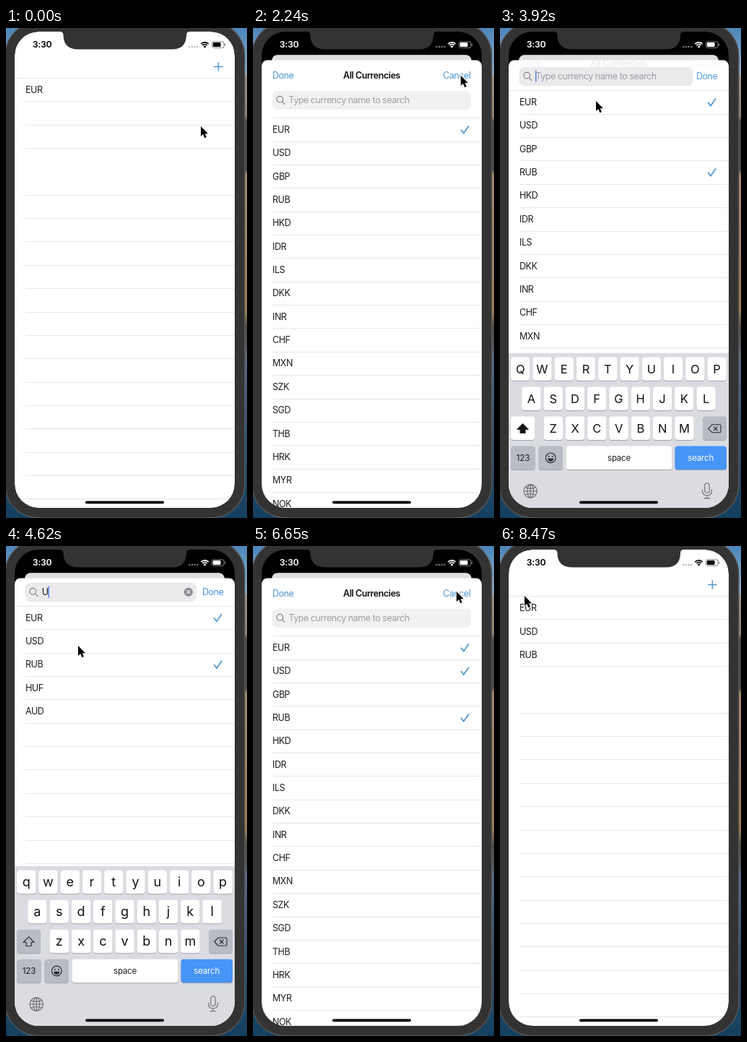
Recreate the animation shown at these times as an HTML page with a canvas. Size 334x678 px, loop 8540 ms.

```html
<!DOCTYPE html>
<html lang="en">
<head>
<meta charset="utf-8">
<title>Currency picker</title>
<style>
html, body { margin: 0; width: 100%; height: 100%; overflow: hidden; background: #333; }
canvas { display: block; width: 334px; height: 678px; }
</style>
</head>
<body>
<canvas id="stage" width="334" height="678"></canvas>
<script>
const ctx = document.getElementById('stage').getContext('2d');
const LOOP = 8540, STEP = 70, ROW = 32.35;
const LEFT = 12, RIGHT = 317, TOP = 5, BOTTOM = 664;
const BLUE = '#4c95cd', INK = '#1c1c1e', LINE = '#e6e6e8';
const CURRENCIES = 'EUR USD GBP RUB HKD IDR ILS DKK INR CHF MXN SZK SGD THB HRK MYR NOK'.split(' ');
const FILTERED = 'EUR USD RUB HUF AUD'.split(' ');

const T = {
  present: 880, tickRub: 2800, focus: 3470, keyboard: 3550, activate: 3640,
  type: 4300, tickUsd: 5200, finish: 6070, dismiss: 7680
};

// time, x, y of the pointer tip
const POINTER = [
  [70, 270, 136], [770, 293, 54], [2150, 293, 54], [2730, 215, 236], [3040, 215, 236],
  [3290, 133, 101], [4200, 133, 101], [4550, 100, 138], [5380, 100, 138],
  [5950, 282, 63], [6650, 282, 63], [7300, 33, 66], [7750, 33, 66], [8100, 34, 69]
];

const clamp = v => Math.max(0, Math.min(1, v));
const mix = (a, b, p) => a + (b - a) * p;
const ease = v => { v = clamp(v); return v * v * (3 - 2 * v); };
const during = (t, from, to) => t >= from && t < to;

// Critically damped approach from 0 to 1
function spring(ms, rate) {
  if (ms <= 0) return 0;
  const x = ms / 1000 * rate;
  return 1 - (1 + x) * Math.exp(-x);
}

function pointerAt(t) {
  const i = POINTER.findIndex(p => p[0] > t);
  if (i < 0) return POINTER[POINTER.length - 1].slice(1);
  if (i === 0) return POINTER[0].slice(1);
  const a = POINTER[i - 1], b = POINTER[i];
  const p = ease((t - a[0]) / (b[0] - a[0]));
  return [mix(a[1], b[1], p), mix(a[2], b[2], p)];
}

function box(x, y, w, h, r, fill) {
  ctx.beginPath();
  ctx.roundRect(x, y, w, h, r);
  if (fill) { ctx.fillStyle = fill; ctx.fill(); }
}

function disc(x, y, r, fill) {
  ctx.beginPath();
  ctx.arc(x, y, r, 0, 7);
  ctx.fillStyle = fill;
  ctx.fill();
}

// Draws open strokes given as an SVG path
function stroke(path, color, width = 1.2) {
  ctx.strokeStyle = color;
  ctx.lineWidth = width;
  ctx.lineCap = ctx.lineJoin = 'round';
  ctx.stroke(new Path2D(path));
}

function label(str, x, y, { size = 12.5, weight = 400, color = INK, align = 'left', track = -0.45 } = {}) {
  ctx.font = `${weight} ${size}px Inter, sans-serif`;
  ctx.letterSpacing = track + 'px';
  ctx.textAlign = align;
  ctx.fillStyle = color;
  ctx.fillText(str, x, y + size * 0.36);
}

function rule(x, y) {
  ctx.fillStyle = LINE;
  ctx.fillRect(x, Math.round(y), RIGHT - x, 1);
}

function faded(alpha, draw) {
  if (alpha <= 0) return;
  ctx.save();
  ctx.globalAlpha *= alpha;
  draw();
  ctx.restore();
}

function wallpaper() {
  const g = ctx.createLinearGradient(0, 0, 0, 678);
  [[0, '#4c86ba'], [.095, '#8fb0cc'], [.1, '#a29080'], [.18, '#968470'], [.19, '#4b4846'],
   [.29, '#4b4846'], [.3, '#ab8e68'], [.45, '#a4865e'], [.58, '#a08058'], [.61, '#504a44'],
   [.65, '#55595c'], [.67, '#566e86'], [.85, '#2c4d6c'], [1, '#14405f']
  ].forEach(([at, color]) => g.addColorStop(at, color));
  ctx.fillStyle = g;
  ctx.fillRect(0, 0, 334, 678);
}

function phoneBody() {
  box(-2, -9, 333.5, 687.5, 47, '#58595b');
  box(-0.8, -7.5, 331, 684.5, 45.5, '#333');
}

function notch() {
  ctx.fillStyle = '#333';
  ctx.fill(new Path2D('M74 4 V5 Q79.5 5 79.5 10 Q80 29.5 100 29.5 H230 Q249.5 29.5 250 10 Q250 5 255 5 V4 Z'));
}

function statusBar(p) {
  const c = Math.round(255 * p), color = `rgb(${c},${c},${c})`;
  label('3:30', 50, 23, { size: 12.3, weight: 600, color, align: 'center', track: -0.3 });
  for (let i = 0; i < 4; i++) disc(254.3 + i * 3.7, 26, 1.3, p > .5 ? '#777' : '#bdbdbd');
  ctx.strokeStyle = color;
  ctx.lineCap = 'butt';
  ctx.lineWidth = 1.7;
  for (const r of [4.3, 7.2]) {
    ctx.beginPath();
    ctx.arc(275.5, 27, r, -Math.PI * .76, -Math.PI * .24);
    ctx.stroke();
  }
  disc(275.5, 25.8, 1.5, color);
  ctx.globalAlpha = .5;
  box(285.5, 18.8, 16.5, 8.6, 2.4);
  ctx.lineWidth = 1;
  ctx.stroke();
  box(302.9, 21.5, 1.2, 3.2, .6, color);
  ctx.globalAlpha = 1;
  box(286.8, 20.1, 10.8, 6, 1.3, color);
}

function homeScreen(t, p) {
  const scale = 1 - .092 * p;
  ctx.save();
  ctx.translate(LEFT + 14 * p, TOP + 32.2 * p);
  ctx.scale(scale, scale);
  ctx.translate(-LEFT, -TOP);
  box(LEFT, TOP, 305, 659, mix(33, 9, p), '#fff');
  ctx.clip();
  stroke('M288.5 53.5 H300 M294.3 47.7 V59.3', BLUE, 1.4);
  rule(LEFT, 69);
  const rows = t >= T.dismiss ? ['EUR', 'USD', 'RUB'] : ['EUR'];
  rows.forEach((name, i) => label(name, 27, 85.8 + i * ROW));
  for (let i = 1; i <= 18; i++) if (i !== 4) rule(27, 69 + i * ROW);
  ctx.fillStyle = `rgba(0,0,0,${.12 * p})`;
  ctx.fillRect(LEFT, TOP, 305, 659);
  ctx.restore();
}

function searchField(t, active) {
  const y = mix(87, 51, active), right = mix(302, 264, active);
  const focused = during(t, T.focus, T.finish);
  const typed = during(t, T.type, T.finish);
  box(26.5, y, right - 26.5, 26, 7, focused ? '#eaeaec' : '#f1f1f2');
  const mid = y + 12.7;
  ctx.beginPath();
  ctx.arc(37.3, mid - 1, 4.3, 0, 7);
  ctx.strokeStyle = '#858589';
  ctx.lineWidth = 1.2;
  ctx.stroke();
  stroke(`M40.5 ${mid + 2.2} L44 ${mid + 5.7}`, '#858589', 1.3);
  if (typed) {
    label('U', 49.7, mid);
    disc(252.8, mid, 6, '#8a8a8e');
    stroke(`M250.6 ${mid - 2.2} l4.4 4.4 m0 -4.4 l-4.4 4.4`, '#eee', 1.1);
  } else {
    label('Type currency name to search', 49.3, mid, { color: '#a0a0a5' });
  }
  const blinkStart = typed ? T.type : T.focus;
  if (focused && (t - blinkStart) % 1000 < 500) {
    ctx.fillStyle = '#4b7fe0';
    ctx.fillRect(typed ? 58.6 : 49, mid - 8, 1.4, 16);
  }
  faded(active, () => label('Done', 272, mid, { color: '#4392e6' }));
}

function currencyList(t, active) {
  const top = mix(124.3, 83, active);
  const names = during(t, T.type, T.finish + 70) ? FILTERED : CURRENCIES;
  const ticked = { EUR: true, RUB: t >= T.tickRub, USD: t >= T.tickUsd };
  rule(active > .5 ? LEFT : 27, top);
  for (let i = 0; top + i * ROW < BOTTOM; i++) {
    const mid = top + (i + .5) * ROW;
    if (names[i]) label(names[i], 27, mid);
    if (ticked[names[i]]) stroke(`M288.6 ${mid + .8} l3.4 4.4 l6.8 -10`, BLUE, 1.7);
    rule(27, top + (i + 1) * ROW);
  }
}

function sheet(t, p, active) {
  if (p < .002) return;
  ctx.save();
  ctx.translate(0, (1 - p) * 619);
  box(LEFT, 44.5, 305, 700, [8, 8, 0, 0], '#fff');
  ctx.clip();
  currencyList(t, active);
  faded(1 - active, () => {
    const y = 65.3 - 18 * active;
    label('Done', 27, y, { color: BLUE });
    label('All Currencies', 164.5, y, { weight: 600, align: 'center', color: '#111' });
    label('Cancel', 301.5, y, { color: BLUE, align: 'right' });
  });
  searchField(t, active);
  ctx.restore();
}

function key(x, y, w, fill = '#fff') {
  box(x, y + 1, w, 32.5, 4, '#a2a4aa');
  box(x, y, w, 32.5, 4, fill);
}

function keyboard(t, p) {
  if (p < .002) return;
  const upper = t < T.type, grey = '#b9bcc5', dark = '#2a2a2c';
  ctx.save();
  ctx.translate(0, (1 - p) * 221);
  ctx.fillStyle = '#dadce1';
  ctx.fillRect(LEFT, 443, 305, 240);
  [['qwertyuiop', 28.2], ['asdfghjkl', 43.4], ['zxcvbnm', 73.8]].forEach(([chars, x0], r) => {
    [...chars].forEach((ch, i) => {
      const x = x0 + i * 30.27, y = 448.8 + r * 41;
      key(x - 13.2, y, 26.4);
      label(upper ? ch.toUpperCase() : ch, x, y + (upper ? 16 : 15.4),
        { size: upper ? 16.5 : 18, align: 'center', track: 0, color: '#111' });
    });
  });

  key(15, 530.8, 33, upper ? '#fff' : grey);
  const arrow = 'M31.5 540.8 L39 548.5 H35 V553.5 H28 V548.5 H24 Z';
  if (upper) { ctx.fillStyle = '#111'; ctx.fill(new Path2D(arrow)); }
  stroke(arrow, dark);
  key(281, 530.8, 33, grey);
  stroke('M294 542 H304.5 Q306 542 306 543.5 V551.5 Q306 553 304.5 553 H294 L288.8 547.5 Z M296.3 545 l5 5 m0 -5 l-5 5', dark, 1.1);

  key(15, 571.8, 33.5, grey);
  label('123', 32, 588.2, { size: 11.5, align: 'center', track: -.1 });
  key(53.5, 571.8, 33.5, grey);
  ctx.beginPath();
  ctx.arc(70.2, 588, 6.8, 0, 7);
  ctx.strokeStyle = dark;
  ctx.lineWidth = 1.2;
  ctx.stroke();
  disc(67.7, 586, 1, dark);
  disc(72.7, 586, 1, dark);
  ctx.fillStyle = dark;
  ctx.fill(new Path2D('M66 588.8 H74.4 Q73.5 593 70.2 593 Q67 593 66 588.8 Z'));
  key(91.5, 571.8, 147, '#fff');
  label('space', 165, 588, { size: 11.5, align: 'center', track: -.2 });
  key(242.5, 571.8, 71.5, '#4795f7');
  label('search', 278.2, 588, { size: 11.5, align: 'center', track: -.2, color: '#fff' });

  const soft = '#68696e';
  ctx.strokeStyle = soft;
  ctx.lineWidth = 1.1;
  for (const rx of [9.2, 4.3]) {
    ctx.beginPath();
    ctx.ellipse(42.2, 634, rx, 9.2, 0, 0, 7);
    ctx.stroke();
  }
  stroke('M33 634 H51.4 M42.2 624.8 V643.2 M35 629 Q42.2 632 49.4 629 M35 639 Q42.2 636 49.4 639', soft, 1.1);
  box(283.8, 623, 6.4, 13.5, 3.2);
  ctx.stroke();
  stroke('M280.5 632 V634 Q281 640 287 640 Q293 640 293.5 634 V632 M287 640 V643.8 M283 643.8 H291', soft, 1.1);
  ctx.restore();
}

function pointer(x, y) {
  ctx.save();
  ctx.translate(x, y);
  const arrow = new Path2D('M0 0 V14 L3.2 11.1 L5.4 16.2 L7.9 15.1 L5.7 10.2 H10 Z');
  ctx.strokeStyle = '#fff';
  ctx.lineWidth = 1.8;
  ctx.lineJoin = 'miter';
  ctx.stroke(arrow);
  ctx.fillStyle = '#000';
  ctx.fill(arrow);
  ctx.restore();
}

function draw(t) {
  const open = spring(t - T.present, 12.4) * (1 - spring(t - T.dismiss, 12.4));
  const active = ease((t - T.activate) / 340) * (1 - ease((t - T.finish) / 380));
  const keys = spring(t - T.keyboard, 14.4) * (1 - spring(t - T.finish, 14.4));

  wallpaper();
  phoneBody();
  ctx.save();
  box(LEFT, TOP, 305, 659, 33, '#000');
  ctx.clip();
  homeScreen(t, open);
  sheet(t, open, active);
  keyboard(t, keys);
  statusBar(ease(open * 1.3 - .15));
  box(110, 654.6, 109, 3.6, 1.8, '#000');
  ctx.restore();
  notch();
  pointer(...pointerAt(t));
}

function tick() {
  const t = performance.now() % LOOP;
  draw(Math.floor(t / STEP) * STEP);
  requestAnimationFrame(tick);
}
tick();
</script>
</body>
</html>
```
